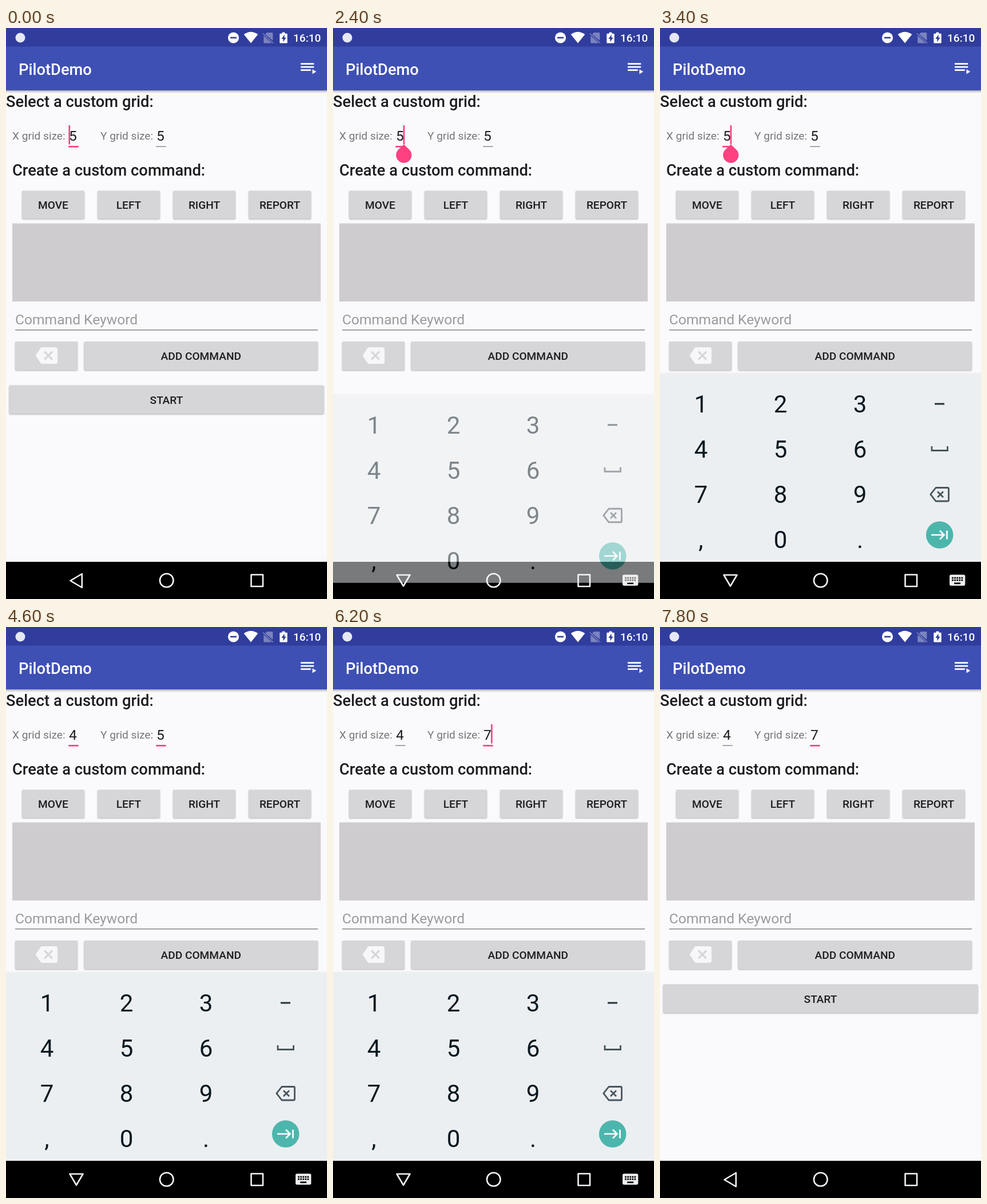
Recreate the animation shown at these times as an HTML page. Size 561 px wide and 998 px high, loop 8 s.

```html
<!DOCTYPE html>
<html lang="en">
<head>
<meta charset="utf-8">
<title>Command grid</title>
<style>
  html, body { margin: 0; width: 100%; height: 100%; overflow: hidden; background: #faf9fb; }
  svg { display: block; width: 561px; height: 998px; font-family: Roboto, sans-serif; }
  .medium { font-weight: 500; }
  .head { font-size: 27.3px; font-weight: 500; fill: #1d1c1e; }
  .label { font-size: 19.1px; fill: #767577; }
  .value { font-size: 24.6px; fill: #1d1c1e; }
  .button rect { fill: #d6d5d7; filter: drop-shadow(0 1.5px 1.3px rgba(0,0,0,.3)); }
  .button text { font-size: 19.1px; font-weight: 500; fill: #1d1c1e; text-anchor: middle; }
  .pink { fill: #ff4081; }
  .line { fill: none; stroke-linejoin: round; }
  #keys text { font-size: 42px; fill: #071820; text-anchor: middle; }
</style>
</head>
<body>
<svg viewBox="0 0 561 998">
  <defs>
    <linearGradient id="shade" x2="0" y2="1">
      <stop stop-color="#000" stop-opacity=".28"/>
      <stop offset="1" stop-color="#000" stop-opacity="0"/>
    </linearGradient>
    <linearGradient id="lift" x2="0" y2="1">
      <stop stop-color="#000" stop-opacity="0"/>
      <stop offset="1" stop-color="#000" stop-opacity=".06"/>
    </linearGradient>
    <path id="drop" class="pink" d="M0 203.5L9.8 212.7A13.6 13.6 0 1 1-9.8 212.7Z"/>
  </defs>
  <rect width="561" height="998" fill="#faf9fb"/>

  <!-- status and title bars -->
  <rect y="109" width="561" height="5" fill="url(#shade)"/>
  <rect width="561" height="109" fill="#3e50b4"/>
  <rect width="561" height="32.5" fill="#303d9d"/>
  <g fill="#fff">
    <circle cx="25" cy="17" r="8.5" fill="#e6e8f4"/>
    <circle cx="397.5" cy="17" r="9.6"/>
    <path d="M392 15.7h11v2.6h-11z" fill="#303d9d"/>
    <path d="M428 26.5L415.7 11.2Q428 2.2 440.3 11.2Z"/>
    <path d="M482.6 9.7V7.6h4.8v2.1h3.3q1 0 1 1V25.500q0 1-1 1h-11.400q-1 0-1-1V10.700q0-1 1-1z"/>
    <path d="M486.600 11.500l-5.200 7.400h3v5.600l5.200-7.700h-3z" fill="#303d9d"/>
    <g opacity=".36">
      <path d="M456 8h9q1.300 0 1.300 1.300V22L453 11zM450.300 13.500L464.500 26.500H451.600q-1.300 0-1.300-1.300z"/>
      <path class="line" d="M449 9.500L467 26.500" stroke="#fff" stroke-width="1.700"/>
    </g>
    <text x="502" y="24" font-size="19.100" class="medium">16:10</text>
    <text x="22" y="81.500" font-size="27.300" class="medium">PilotDemo</text>
    <path transform="translate(512.300 54.500) scale(1.365)" d="M19 9H2v2h17zM19 5H2v2h17zM2 15h13v-2H2zM17 13v6l5-3z"/>
  </g>

  <!-- form -->
  <text class="head" x="0" y="138">Select a custom grid:</text>
  <text class="head" x="11" y="258">Create a custom command:</text>
  <text class="label" x="11" y="195">X grid size:</text>
  <g id="fieldX" transform="translate(110 0)"></g>
  <g id="groupY">
    <text class="label" x="165" y="195">Y grid size:</text>
    <g id="fieldY" transform="translate(263 0)"></g>
  </g>
  <rect x="11" y="341.500" width="539" height="136.500" fill="#cecccf"/>
  <text x="16" y="518" font-size="24.600" fill="#9b9a9c">Command Keyword</text>
  <rect x="16" y="527" width="529" height="1.500" fill="#858486"/>
  <g id="buttons"></g>
  <path transform="translate(51.700 553.300) scale(1.6)" fill="#f7f6f8" d="M22 3H7c-.69 0-1.230.350-1.590.880L0 12l5.410 8.110c.360.530.900.890 1.590.890h15c1.100 0 2-.900 2-2V5c0-1.100-.900-2-2-2zm-3 12.590L17.590 17 14 13.410 10.410 17 9 15.590 12.590 12 9 8.410 10.410 7 14 10.590 17.590 7 19 8.410 15.410 12z"/>

  <!-- navigation bar and keyboard -->
  <rect y="933" width="561" height="65" fill="#000"/>
  <g id="keys">
    <rect y="601" width="561" height="4" fill="url(#lift)"/>
    <rect y="605" width="561" height="328" fill="#eceff1"/>
    <g id="digits"></g>
    <rect x="480" y="655.500" width="17" height="3" fill="#25343c"/>
    <g class="line" stroke="#47555d" stroke-width="2.800">
      <path d="M475 731v7.500h27.500v-7.500" stroke-linejoin="miter"/>
      <path d="M482 803.500h20.500q2 0 2 2v19.500q0 2-2 2H482L472.800 815.200zM485 810.200l10 10m0-10l-10 10"/>
    </g>
    <circle cx="488.700" cy="886" r="23.800" fill="#4db6ac"/>
    <path class="line" d="M474 886h22M489 878.500l7.500 7.500-7.500 7.500M501.500 878.500v15" stroke="#fff" stroke-width="2.700" style="stroke-linejoin:miter"/>
  </g>
  <rect id="ripple" x="50" y="933" width="145" height="65" rx="32" fill="#fff"/>
  <g class="line" stroke="#f4f4f4" stroke-width="2.600">
    <path id="back" d="M112.500 966L132.800 954V978Z"/>
    <path id="hide" d="M111.500 956H134.500L123 975.500Z"/>
    <circle cx="280.700" cy="965.500" r="11.800"/>
    <path d="M428.500 955.500h20.500v20.500h-20.500z"/>
  </g>
  <path id="switch" transform="translate(503.300 948.800) scale(1.365)" fill="#eee" fill-rule="evenodd" d="M4 5h16q2 0 2 2v10q0 2-2 2H4q-2 0-2-2V7q0-2 2-2zM5 8v2h2V8zm3 0v2h2V8zm3 0v2h2V8zm3 0v2h2V8zm3 0v2h2V8zM5 11v2h2v-2zm3 0v2h2v-2zm3 0v2h2v-2zm3 0v2h2v-2zm3 0v2h2v-2zM8 15v2h8v-2z"/>
</svg>
<script>
const $ = id => document.getElementById(id);
const show = (el, on) => el.setAttribute('visibility', on ? 'visible' : 'hidden');
const within = (t, ...spans) => spans.some(([a, b]) => t >= a && t < b);

const button = (x, y, w, h, label, id = '') =>
  `<g class="button" id="${id}"><rect x="${x}" y="${y}" width="${w}" height="${h}" rx="2"/>
   <text x="${x + w / 2}" y="${y + h / 2 + 7}">${label}</text></g>`;

$('buttons').innerHTML =
  ['MOVE', 'LEFT', 'RIGHT', 'REPORT'].map((s, i) => button(28 + 132 * i, 284.5, 109, 49, s)).join('') +
  button(16, 548, 109, 50, '') +
  button(136.5, 548, 408.5, 50, 'ADD COMMAND') +
  button(5.5, 624.5, 550, 50, 'START', 'start');

$('digits').innerHTML = [...'123456789,0.'].map((c, i) =>
  `<text x="${71.5 + 139 * (i % 3)}" y="${672 + 79 * (i >> 2 < 0 ? 0 : Math.floor(i / 3))}">${c}</text>`).join('');

for (const id of ['fieldX', 'fieldY'])
  $(id).innerHTML = `<text class="value" y="196.5"></text><rect class="rule" x="-.8"/>
    <rect class="caret pink" y="170" width="2.7" height="33.5"/><use href="#drop" x="13.8"/>`;

function setField(id, text, focus, caret, caretX, drop) {
  const [value, rule, bar, handle] = $(id).children;
  value.textContent = text;
  rule.setAttribute('width', text ? 17.5 : 3.7);
  rule.setAttribute('y', focus ? 206 : 206.5);
  rule.setAttribute('height', focus ? 2.7 : 1.4);
  rule.setAttribute('fill', focus ? '#ff4081' : '#858486');
  bar.setAttribute('x', caretX);
  show(bar, caret);
  show(handle, drop);
}

// How far the keyboard has come in, 0 to 1
function keyboardLevel(t) {
  if (t < 2200 || t >= 7400) return 0;
  if (t < 6800) return 1 - (1 - Math.min(1, (t - 2200) / 667)) ** 2;
  return 1 - Math.min(1, (t - 6800) / 378) ** 2;
}

function draw(now) {
  const t = Math.floor(now % 8000 / 200) * 200;
  const x = t < 3600 ? '5' : t < 4000 ? '' : '4';
  const y = t < 5800 ? '5' : t < 6200 ? '' : '7';
  setField('fieldX', x, t < 4800,
    within(t, [0, 600], [1000, 1600], [2200, 3000], [3400, 4600]),
    t < 2200 || !x ? -.6 : 12.6, within(t, [2200, 3600]));
  setField('fieldY', y, t >= 4600,
    within(t, [4800, 5200], [5600, 6800], [7200, 7800]),
    y ? 13 : -.6, within(t, [4800, 5800]));
  $('groupY').setAttribute('transform', `translate(${x ? 0 : -13.8} 0)`);

  const level = keyboardLevel(t);
  $('keys').setAttribute('opacity', level);
  $('keys').setAttribute('transform', `translate(0 ${75 * (1 - level)})`);
  const open = within(t, [2400, 7000]);
  show($('start'), !open);
  show($('back'), !open);
  show($('hide'), open);
  show($('switch'), open);
  $('ripple').setAttribute('opacity', within(t, [6800, 7400]) ? (t === 7000 ? .1 : .05) : 0);
  requestAnimationFrame(draw);
}
requestAnimationFrame(draw);
</script>
</body>
</html>
```
